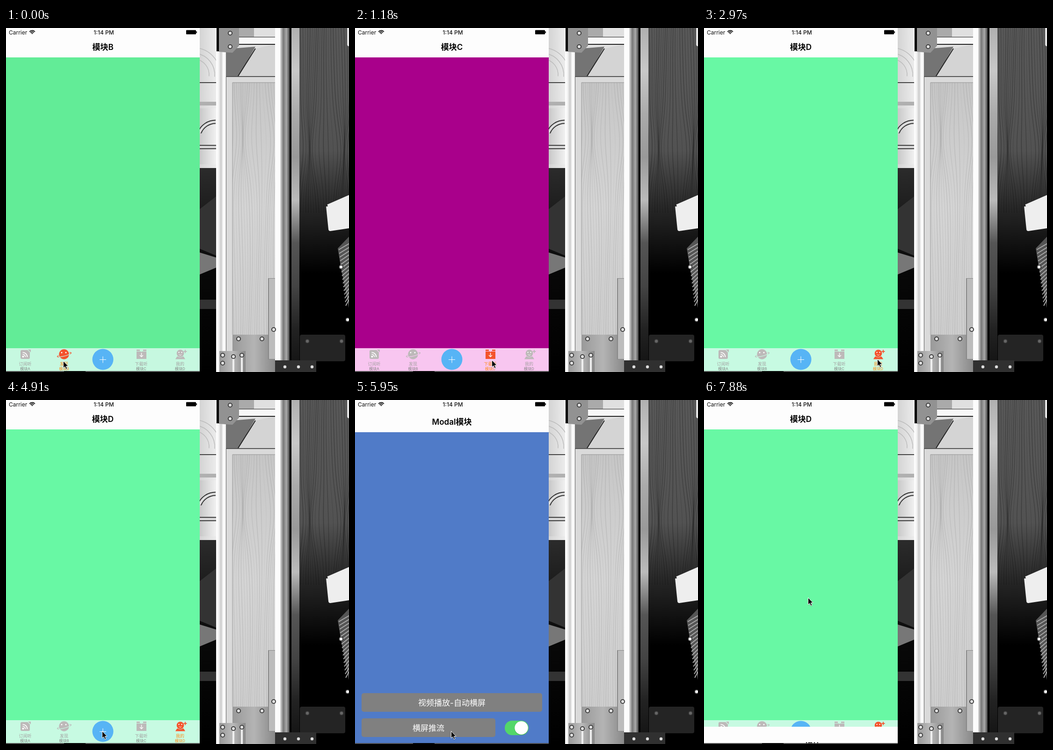
Write an HTML page with a canvas that moves like this. It is 733 px wide and 737 px high and loops after 8 s.

```html
<!DOCTYPE html>
<html lang="zh">
<head>
<meta charset="utf-8">
<title>Tab bar demo</title>
<style>
html, body { margin: 0; width: 100%; height: 100%; overflow: hidden; background: #fff; }
canvas { display: block; }
</style>
</head>
<body>
<canvas id="stage" width="733" height="737"></canvas>
<script>
const LOOP = 8000, W = 414, H = 735, STEP = 148.6;
const MID = W / 2, SLOT = W / 5;
const FONT = 'Inter, "Noto Sans CJK SC", "Noto Sans CJK", sans-serif';
const GREY = '#bdb9b9', ORANGE = '#f4532d';

const stage = document.getElementById('stage').getContext('2d');
const backdrop = document.createElement('canvas');
backdrop.width = 733;
backdrop.height = 737;
let g = backdrop.getContext('2d');

function rect(x, y, w, h, fill) {
  g.fillStyle = fill;
  g.fillRect(x, y, w, h);
}
function round(x, y, w, h, r, fill) {
  g.fillStyle = fill;
  g.beginPath();
  g.roundRect(x, y, w, h, r);
  g.fill();
}
function disc(x, y, r, fill) {
  g.fillStyle = fill;
  g.beginPath();
  g.arc(x, y, r, 0, Math.PI * 2);
  g.fill();
}
function poly(points, fill) {
  g.fillStyle = fill;
  g.beginPath();
  points.forEach(p => g.lineTo(...p));
  g.closePath();
  g.fill();
}
function line(points, color, width) {
  g.strokeStyle = color;
  g.lineWidth = width;
  g.beginPath();
  points.forEach(p => g.lineTo(...p));
  g.stroke();
}
function arc(x, y, r, from, to, color, width) {
  g.strokeStyle = color;
  g.lineWidth = width;
  g.beginPath();
  g.arc(x, y, r, from * Math.PI, to * Math.PI);
  g.stroke();
}
function text(str, x, y, size, weight, color, align = 'center') {
  g.font = `${weight} ${size}px ${FONT}`;
  g.textAlign = align;
  g.fillStyle = color;
  g.fillText(str, x, y);
}
function plus(x, y, arm, width, color) {
  rect(x - arm, y - width / 2, arm * 2, width, color);
  rect(x - width / 2, y - arm, width, arm * 2, color);
}

// Rectangles shaded downwards and sideways
function shade(grad, x, y, w, h, colors) {
  colors.forEach((c, i) => grad.addColorStop(i / (colors.length - 1), c));
  rect(x, y, w, h, grad);
}
const fade = (x, y, w, h, ...colors) => shade(g.createLinearGradient(0, y, 0, y + h), x, y, w, h, colors);
const tube = (x, y, w, h, ...colors) => shade(g.createLinearGradient(x, 0, x + w, 0), x, y, w, h, colors);

function bolts(x, y, dx, dy, count, color = '#ddd') {
  for (let i = 0; i < count; i++) {
    disc(x + i * dx, y + i * dy, 5, '#333');
    disc(x + i * dx, y + i * dy, 3.2, color);
  }
}

// Wavy wood fibres that part around a knot
function grain(x, y, w, h, knot, color) {
  g.save();
  g.beginPath();
  g.rect(x, y, w, h);
  g.clip();
  for (let i = 0; i * 5 < w + 20; i++) {
    const pts = [];
    for (let py = y; py <= y + h; py += 12) {
      const swell = Math.exp(-(((py - knot) / 75) ** 2));
      pts.push([x - 10 + i * 5 + 3 * Math.sin(py / 95 + i * 0.3) + swell * 11 * Math.sin(i * 0.45), py]);
    }
    line(pts, color, 0.5 + Math.abs(Math.sin(i * 2.3)));
  }
  g.restore();
}

function paintInterior() {
  tube(W, 0, 36, 300, '#d4d4d4', '#ececec');
  for (let r = 34; r < 60; r += 12) arc(400, 100, r, -0.45, 0.03, '#bbb', 1.5);
  rect(W, 116, 36, 2, '#444');
  rect(W, 158, 36, 8, '#b0b0b0');
  tube(W, 172, 36, 120, '#c8c8c8', '#f2f2f2');
  for (const [color, width] of [['#333', 9], ['#ddd', 5]]) {
    arc(448, 238, 37, 1.12, 1.5, color, width);
    rect(W, 255 - width / 2, 36, width, color);
  }
  fade(W, 300, 36, 437, '#2b2b2b', '#080808', '#000');
  poly([[W, 388], [450, 360], [450, 488], [W, 473]], '#333');
  poly([[W, 481], [450, 492], [450, 513], [W, 528]], '#777');
  rect(W, 582, 36, 20, '#333');
}

function paintPaleDoor() {
  rect(470, 0, 106, 105, '#e0e0e0');
  rect(497, 0, 33, 20, '#aaa');
  poly([[470, 45], [533, 40], [497, 103], [470, 103]], '#747474');
  poly([[533, 44], [576, 35], [576, 103], [497, 103]], '#d4d4d4');
  line([[533, 44], [496, 103]], '#222', 2);
  rect(490, 19, 86, 17, '#222');
  rect(490, 20, 86, 14, '#f8f8f8');

  rect(470, 103, 106, 634, '#555');
  rect(470, 105, 106, 632, '#dadada');
  fade(484, 116, 92, 541, '#c6c6c6', '#d4d4d4', '#cecece');
  grain(484, 117, 92, 540, 240, 'rgba(130,130,130,.22)');
  line([[484, 657], [484, 117], [575, 117]], '#999', 1);
  tube(484, 657, 92, 80, '#999', '#b4b4b4', '#888');
  rect(560, 536, 18, 174, '#888');
  rect(562, 537, 14, 172, '#bcbcbc');
}

function paintDarkDoor() {
  fade(627, 0, 106, 657, '#585858', '#565656', '#525252', '#242424', '#000', '#000');
  grain(627, 0, 106, 400, 265, 'rgba(15,15,15,.3)');
  g.lineJoin = 'round';
  const paper = [[688, 382], [740, 359], [740, 424], [693, 431], [688, 382]];
  poly(paper, '#eee');
  line(paper, '#eee', 8);
  poly([[709, 472], [733, 447], [733, 600], [716, 515]], '#555');
  for (let i = 0; i < 16; i++) line([[711 + i, 475 + i * 8], [733, 462 + i * 8]], '#aaa', 2);
  bolts(716, 512, 14, 113, 2, '#eee');
  round(729, -6, 12, 45, 4, '#e6e6e6');
  round(628, 657, 97, 57, 4, '#242424');
  bolts(644, 671, 73, 0, 2, '#666');
}

function paintBackdrop() {
  rect(0, 0, 733, 737, '#000');
  paintInterior();
  paintPaleDoor();
  paintDarkDoor();

  // posts
  tube(449, 50, 21, 687, '#fff', '#f4f4f4', '#ccc', '#fff', '#eee');
  rect(470, 105, 1, 587, '#666');
  rect(575, 0, 12, 737, '#fcfcfc');
  tube(586, 0, 20, 737, '#ddd', '#777', '#aaa', '#444');
  fade(610, 0, 17, 737, '#b0b0b0', '#c8c8c8', '#aaa', '#999', '#bbb', '#555', '#444', '#222', '#111');

  // brackets
  poly([[455, 0], [498, 0], [498, 38], [484, 53], [455, 51]], '#929292');
  bolts(479, 11, 0, 29, 2);
  tube(456, 692, 56, 45, '#999', '#bbb', '#888');
  for (const x of [486, 504]) rect(x - 2, 700, 4, 37, '#eee');
  bolts(463, 701, 0, 17, 2);
  bolts(486, 704, 18, -3, 2);
  bolts(497, 666, 50, 0, 2);
  bolts(572, 646, 0, 0, 1);
  rect(575, 712, 88, 25, '#303030');
  bolts(596, 726, 29, 0, 3);

  // strip below the phone screen
  rect(0, H, W, 2, '#4a4a4a');
  rect(124, H, 46, 2, '#000');
}

// Tab icons, drawn around their own centre
function feedIcon(c, bg) {
  round(-10, -9, 20, 19, 3, c);
  poly([[4, -10], [12, -10], [12, -2]], bg);
  poly([[6, -10], [12, -10], [12, -4]], c);
  disc(-4.5, 5, 2, '#fff');
  for (const r of [6, 10]) arc(-5.5, 6, r, -0.5, 0, '#fff', 1.7);
}
function planetIcon(c, bg) {
  const ring = (color, from, to) => {
    g.strokeStyle = color;
    g.lineWidth = 1.3;
    g.beginPath();
    g.ellipse(0.5, 1, 15.5, 2.8, -0.27, from * Math.PI, to * Math.PI);
    g.stroke();
  };
  disc(0, 0, 10.7, c);
  ring(bg, 0.1, 0.9);
  ring(c, -0.22, 0.22);
  ring(c, 0.78, 1.22);
  for (const x of [-5, 4]) disc(x, -3.5, 1.4, '#fff');
}
function boxIcon(c, bg) {
  rect(-10, -10, 21, 20, c);
  rect(-10, -7, 21, 1, bg);
  poly([[-3, -10], [4, -10], [4, -7], [0.5, -5], [-3, -7]], bg);
  line([[0.5, -3], [0.5, 5]], '#fff', 1.4);
  line([[-3, 2], [0.5, 5.5], [4, 2]], '#fff', 1.4);
}
function personIcon(c, bg) {
  poly([[-10, 10.5], [-7, 5.5], [-3, 3.5], [4, 3.5], [8, 5.5], [11, 10.5]], c);
  disc(0.5, -2, 8.6, bg);
  disc(0.5, -2, 7.8, c);
  plus(11, -6, 3.5, 1.8, c);
  for (const x of [-2.5, 3.5]) disc(x, -4, 1.2, '#fff');
  arc(0.5, -1, 3, 0.15, 0.85, '#fff', 1);
}

const tabs = [
  { slot: 0, label: '订阅听', name: '模块A', icon: feedIcon },
  { slot: 1, label: '发现', name: '模块B', icon: planetIcon, page: '#62ec97', bar: '#c6f8e0' },
  { slot: 3, label: '下载听', name: '模块C', icon: boxIcon, page: '#a9008b', bar: '#f8c6f0' },
  { slot: 4, label: '我的', name: '模块D', icon: personIcon, page: '#68f8a4', bar: '#c7fae2' }
];

function drawStatus() {
  text('Carrier', 6, 14, 12, 400, '#111', 'left');
  for (const r of [2, 5, 8]) arc(56, 13.5, r, -0.76, -0.24, '#111', 1.8);
  text('1:14 PM', 209, 14, 12, 500, '#111');
  round(385, 4.5, 21, 9, 1, '#000');
  rect(406.5, 7, 1.5, 4, '#000');
}

function drawNav(title, y) {
  rect(0, y - 1, W, 64, '#fdfdfd');
  text(title, MID, y + 47, 17, 600, '#000');
}

function drawTabs(active, pressed) {
  const { page, bar, name } = tabs[active];
  rect(0, 63, W, 623, page);
  rect(0, 686, W, H - 686, bar);
  drawNav(name, 0);
  tabs.forEach((tab, i) => {
    const on = i === active;
    g.save();
    g.translate(Math.floor((tab.slot + 0.5) * SLOT), 699);
    tab.icon(on ? ORANGE : GREY, bar);
    text(tab.label, 0, 23.5, 9, 400, on ? '#ff8c1a' : '#a3a0a0');
    text(tab.name, 0, 33.5, 8, 400, on ? '#ff8c1a' : '#858585');
    g.restore();
  });
  disc(MID, 710, 22.5, pressed ? '#4695cb' : '#57b4f5');
  plus(MID, 710.5, 7, 1, '#fff');
}

function drawButton(label, y, w) {
  round(14, y, w, 40, 5, '#808080');
  text(label, 14 + w / 2, y + 26.5, 17, 400, '#fff');
}

function drawModal(y) {
  rect(0, y - 1, W, H + 1, '#507bc8');
  drawNav('Modal模块', y);
  drawButton('视频播放-自动横屏', y + 622, 386);
  drawButton('横屏推流', y + 676, 286);
  round(320, y + 681, 51, 31, 15.5, '#53d769');
  disc(355.5, y + 697.5, 14.5, 'rgba(0,0,0,.18)');
  disc(355.5, y + 696.5, 14.2, '#fff');
}

function drawCursor(x, y) {
  const shape = [[0, 0], [0, 15], [3.4, 12], [6, 17.5], [8.4, 16.4], [6, 11], [10.5, 11], [0, 0]];
  g.save();
  g.translate(x + 0.5, y + 0.5);
  g.shadowColor = 'rgba(0,0,0,.35)';
  g.shadowBlur = 2;
  g.shadowOffsetY = 1;
  poly(shape, '#000');
  g.shadowColor = 'transparent';
  line(shape, '#fff', 1);
  g.restore();
}

// Pointer moves; bow pushes the path to the right midway
const moves = [
  { from: 149, to: 892, x: 292, y: 711, bow: 0 },
  { from: 1635, to: 2080, x: 370, y: 709, bow: 0 },
  { from: 3269, to: 4161, x: 131, y: 710, bow: 0 },
  { from: 4309, to: 4904, x: 205, y: 709, bow: 62 },
  { from: 6687, to: 7430, x: 222, y: 423, bow: 62 }
];

function pointerAt(t) {
  let x = 122, y = 713;
  for (const m of moves) {
    const p = Math.min(1, Math.max(0, (t - m.from) / (m.to - m.from)));
    const e = p * p * (3 - 2 * p);
    x += (m.x - x) * e + m.bow * Math.sin(Math.PI * e);
    y += (m.y - y) * e;
  }
  return [Math.round(x), Math.round(y)];
}

// Critically damped spring: share of the way still to go
function remaining(ms) {
  const s = Math.max(0, ms) * 0.01826;
  return (1 + s) * Math.exp(-s);
}
const modalOffset = t => Math.floor(736 * (remaining(t - 5576.2) + 1 - remaining(t - 7612)));

function draw(time) {
  const t = Math.floor((time + 9) / STEP) * STEP;
  g.drawImage(backdrop, 0, 0);
  g.save();
  g.beginPath();
  g.rect(0, 0, W, H);
  g.clip();
  drawTabs(t < 1180 ? 1 : t < 2960 ? 2 : 3, t > 5490 && t < 5640);
  const y = modalOffset(t);
  if (y < 736) drawModal(y);
  drawStatus();
  g.restore();
  drawCursor(...pointerAt(t));
}

paintBackdrop();
g = stage;
const start = performance.now();
function tick() {
  draw((performance.now() - start) % LOOP);
  requestAnimationFrame(tick);
}
tick();
</script>
</body>
</html>
```
